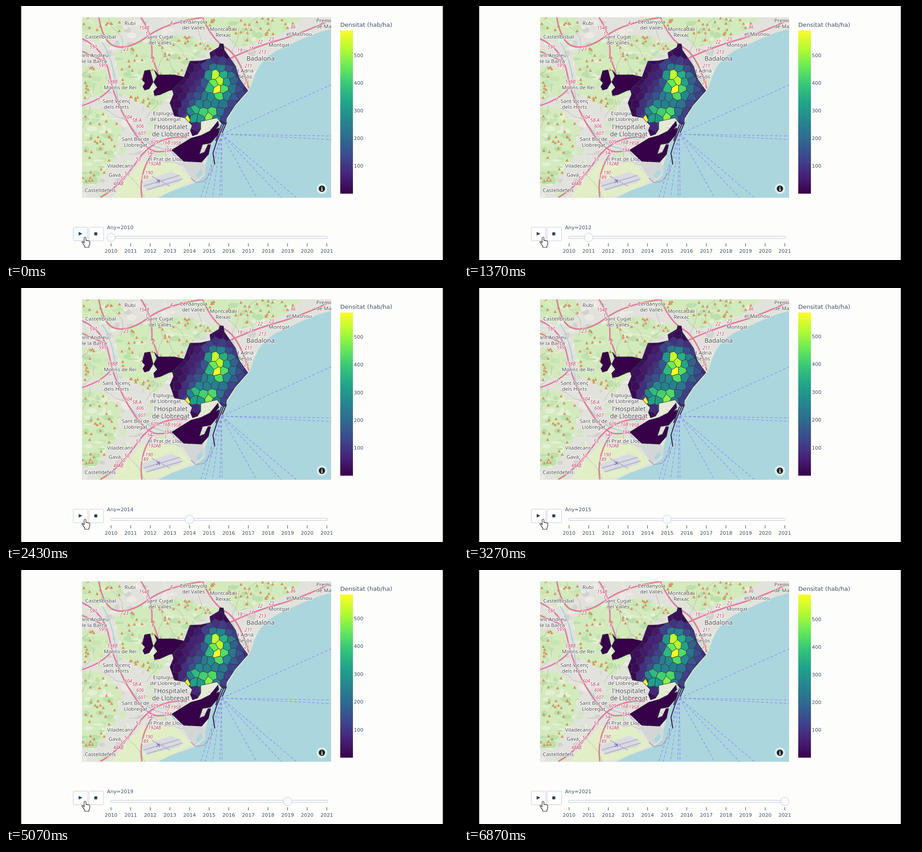
Write an HTML page that moves like this. It is 998 by 561 pixels and loops after 6910 ms.

```html
<!DOCTYPE html>
<html lang="ca">
<head>
<meta charset="utf-8">
<title>Densitat</title>
<style>
html, body { margin: 0; width: 100%; height: 100%; overflow: hidden; background: #fdfdfb; }
svg { display: block; width: 998px; height: 561px; }
.ui { font-family: "DejaVu Sans", sans-serif; font-size: 11px; fill: #3f4f69; }
.place, .ref { font-family: "Noto Sans", "Open Sans", sans-serif; text-anchor: middle;
  paint-order: stroke; stroke: #fffb; stroke-width: 2.5px; stroke-linejoin: round; }
.place { fill: #4b4a50; font-size: 11.5px; }
.big { font-size: 14px; }
.ref { fill: #b83a5c; font-size: 10px; font-style: italic; font-weight: 500; }
</style>
</head>
<body>
<svg viewBox="0 0 998 561">
  <defs>
    <clipPath id="frame"><path d="M168 25H718V423.500H168z"/></clipPath>
    <clipPath id="cityClip"><path id="cityShape"/></clipPath>
    <clipPath id="hillClip"><path id="hillShape"/></clipPath>
    <linearGradient id="scale" x1="0" y1="1" x2="0" y2="0"></linearGradient>
  </defs>
  <path d="M0 0H33.500V561H0zM964.500 0H998V561H964.500z"/>
  <g clip-path="url(#frame)">
    <path fill="#e2e2dc" d="M168 25H718V424H168z"/>
    <g id="land"></g>
    <g id="roads" fill="none" stroke-linejoin="round"></g>
    <g id="sea"></g>
    <g id="labels"></g>
    <g id="city" stroke="#333b40" stroke-linejoin="round"></g>
    <circle cx="697.5" cy="403.5" r="11.5" fill="#fff" opacity=".6"/>
    <circle cx="697.5" cy="403.5" r="7" fill="#222"/>
    <path d="M697.5 399v1.9M696 402.8h1.7v4M695.7 407h4" stroke="#fff" stroke-width="1.6" fill="none"/>
  </g>
  <g class="ui">
    <text x="738" y="46" font-size="13.1">Densitat (hab/ha)</text>
    <path fill="url(#scale)" d="M738 54H766V414.500H738z"/>
    <g id="ticks"></g>
    <g stroke="#c3cad6">
      <rect id="play" x="148.5" y="488.5" width="32" height="30" rx="2"/>
      <rect x="183.5" y="488.5" width="32" height="30" rx="2" fill="#fff"/>
      <rect x="230.5" y="508.5" width="480" height="5" rx="2.5" fill="#f8fafc"/>
      <circle id="handle" cy="511" r="9.5" fill="#f8fafc"/>
    </g>
    <path fill="#2a3f5f" d="M160.500 499L168.500 503L160.500 507zM195 500h6.500v6.500h-6.500z"/>
    <text id="year" x="223" y="493"></text>
    <g id="years" text-anchor="middle"></g>
  </g>
  <path fill="#fff" stroke="#222" stroke-width="1.2" stroke-linejoin="round"
    d="M172.500 521v-9q2-3 4 0v6q2-1 3 .5q2-1 3 .5q2.500-.5 2.500 2v4q0 3-2 5v3h-9v-2q-1-3-4-6l-2.500-4q1-2 3 0l2 2z"/>
</svg>
<script>
const $ = id => document.getElementById(id);
const add = (id, markup) => $(id).insertAdjacentHTML('beforeend', markup);
const path = (d, attrs = '') => `<path d="${d}" ${attrs}/>`;

let seed = 11;
const random = () => (seed = seed * 16807 % 2147483647) / 2147483647;
const between = (a, b) => a + random() * (b - a);
const repeat = (n, make) => Array.from({ length: n }, (_, i) => make(i)).join('');

const palette = ['#37014a', '#472279', '#3d478d', '#2f6990', '#25868f',
  '#20a48a', '#35c67a', '#68ea58', '#b5fb31', '#fdfb2b'];
const rgb = hex => [1, 3, 5].map(i => parseInt(hex.slice(i, i + 2), 16));
function colour(share) {
  const x = Math.max(0, Math.min(0.9999, share)) * 9, i = Math.floor(x);
  const a = rgb(palette[i]), b = rgb(palette[i + 1]);
  return `rgb(${a.map((v, k) => Math.round(v + (b[k] - v) * (x - i)))})`;
}
palette.forEach((c, i) => add('scale', `<stop offset="${i / 9}" stop-color="${c}"/>`));

// Land: hills with woods and peaks, built-up blocks elsewhere
const hills = 'M240 105L290 78L382 62L474 86L404 124L366 190L330 236L254 190Z' +
  'M384 25H655L616 58L545 84L505 92L480 48L440 50Z' +
  'M168 130L222 140L228 175L212 198L168 205ZM168 222L214 228L256 270L240 340L196 398L168 394Z' +
  'M168 25H245L262 52L214 82L168 66Z';
const hillArea = new Path2D(hills), tester = document.createElement('canvas').getContext('2d');
const inHills = (x, y) => tester.isPointInPath(hillArea, x, y);
$('hillShape').setAttribute('d', hills);

const blob = (fills, size) => {
  const fill = fills[Math.floor(random() * fills.length)];
  return `<ellipse cx="${between(168, 640)}" cy="${between(25, 423)}" rx="${between(2, size)}" ry="${between(2, size * .6)}" fill="${fill}"/>`;
};
const peak = () => {
  const x = between(168, 640), y = between(25, 400);
  return inHills(x, y) ? path(`M${x} ${y - 4}l3.500 6.500h-7z`) : '';
};
add('land', repeat(260, () => blob(['#d3d2d1', '#d8d8d6', '#eceae3', '#d3e8bf'], 13)) +
  `<g clip-path="url(#hillClip)">${path(hills, 'fill="#d3eabd"')}${repeat(330, () => blob(['#bcdfab', '#c7e5b4', '#e3f0d5'], 14))}</g>` +
  path('M250 400L300 345L372 344L412 386L350 416L300 424H236Z', 'fill="#e1eec6"') +
  path('M300 388L365 366L388 376L384 390L310 408Z', 'fill="#dadae2"') +
  path('M303 398L383 374M311 406L390 382M322 376L362 398', 'stroke="#b9b8cc" stroke-width="2.500"') +
  path('M428 248L466 247L460 270L430 286Z', 'fill="#e4ead4"') +
  `<g fill="#d09960">${repeat(520, peak)}</g>`);

// Sea, harbour and ferry lines fanning out from the port
add('sea', path('M718 50L690 58L655 72L622 87L596 99L574 114L558 134L548 154L541 176L534 190L506 222L482 262L468 258L446 330L440 350L438 374L420 389L366 408L334 424H718Z', 'fill="#abd6de" stroke="#e5e3cd"') +
  path('M386 344L432 347L440 352L437 372L418 388L405 374Z', 'fill="#d4d5d6"') +
  path('M453 350L455 364L437 387L419 390L408 380', 'fill="none" stroke="#aaa5bd" stroke-width="2"') +
  path('M430 360L435 369L424 381L419 374Z', 'fill="#abd6de"') +
  path(['718 174', '718 287', '718 295', '641 423', '608 423', '553 423', '477 423', '472 423', '456 423', '440 423', '430 423']
    .map(end => `M476 283L${end}`).join(''), 'stroke="#8a8aef" stroke-width="1.2" stroke-dasharray="6 4"'));

// Roads: a few motorways over a seeded web of streets
const street = () => {
  let d = `M${between(168, 560)} ${between(25, 400)}`, angle = between(0, 6.3);
  for (let i = 0; i < 5; i++, angle += between(-.7, .7)) d += `l${18 * Math.cos(angle)} ${18 * Math.sin(angle)}`;
  return d;
};
const motorways = 'M168 72Q218 95 228 150T272 262T334 322L372 320M168 220Q215 205 234 178M208 423Q250 400 290 342T400 290' +
  'M300 423Q292 370 324 324M205 25Q215 85 245 90T314 66T436 25M298 25Q325 65 322 110L336 150' +
  'M434 25Q455 75 485 92T536 182M718 30Q650 62 600 76T494 116M168 100L222 124';
add('roads', path(repeat(26, street), 'stroke="#b9b6b4" stroke-width="1"') + path(repeat(16, street), 'stroke="#f7efd2" stroke-width="1.3"') +
  path('M212 80Q235 110 244 186T322 308L366 322L386 345', 'stroke="#a6cbd8" stroke-width="2"') +
  path(motorways, 'stroke="#d8688c" stroke-width="3"') + path(motorways, 'stroke="#ec94ab" stroke-width="1"'));

// Labels: one or two lines, centre x and first baseline
['Rubí@274 42', 'Castellbisbal@209 72', 'Sant Cugat/del Vallès@340 72', 'Cerdanyola/del Vallès@414 39',
  'Montcada i/Reixac@480 55', 'Premià/de Mar@704 36', 'el Masnou@647 66', 'Montgat@603 90', 'Badalona@562 121 big',
  'Sant Adrià/de Besòs@519 147', 'Sant Andreu/de la Barca@193 113', 'Molins de Rei@252 184', 'Sant Vicenç/dels Horts@244 214',
  'Esplugues/de Llobregat@352 241', "l'Hospitalet/de Llobregat@364 272 big", 'Sant Boi de/Llobregat@286 298',
  'el Prat de Llobregat@366 342', 'Viladecans@252 357', 'Gavà@240 377', 'Castelldefels@208 411', 'Barcelona@463 239 big'
].forEach(item => {
  const [text, place] = item.split('@'), [x, y, size = ''] = place.split(' ');
  text.split('/').forEach((line, i) =>
    add('labels', `<text class="place ${size}" x="${x}" y="${+y + i * (size ? 16 : 13)}">${line}</text>`));
});
('591@193 94,595@213 135,154B@305 52,11@313 65,23@265 99,8@324 125,4@365 41,598B@235 171,7@205 211,604@270 249,5B-A@289 256,' +
  '606@296 269,607@300 285,609@328 304,16B@354 305,195B@375 307,194@357 322,54@317 328,53@292 342,192AB@328 352,190@316 372,' +
  '189@306 382,50@267 374,50@258 384,48AB@248 396,86@634 50,22@561 83,23@586 77,19@516 102,21@541 98,213@566 105,211@535 136,26@531 173')
  .split(',').forEach(item => {
    const [text, x, y] = item.split(/[@ ]/);
    add('labels', `<text class="ref" x="${x}" y="${y}">${text}</text>`);
  });
add('labels', '<text x="337" y="392" font-size="15" fill="#7d69b5" text-anchor="middle" font-family="DejaVu Sans, sans-serif" transform="rotate(-45 337 387)">✈</text>');

// Density falls away from the centre; each peak adds x, y, radius, height
const densePeaks = [[423, 236, 24, 330], [452, 238, 17, 330], [462, 187, 19, 370], [463, 146, 20, 300], [483, 160, 28, 170]];
const bump = (x, y, cx, cy, r, height) => height * Math.exp(-((x - cx) ** 2 + (y - cy) ** 2) / r ** 2);
const density = (x, y) => densePeaks.reduce((sum, p) => sum + bump(x, y, ...p), bump(x, y, 470, 200, 62, 200));

const sites = [];
for (let row = 0; row < 13; row++)
  for (let col = 0; col < 11; col++) {
    const x = 362 + (col + row % 2 / 2) * 17 + between(-5, 5), y = 88 + row * 16 + between(-5, 5);
    sites.push({ at: [x, y], value: density(x, y) * between(.8, 1.15) });
  }

// Keeps the part of a polygon that is nearer to a than to b
function nearer(poly, a, b) {
  const side = p => (p[0] - (a[0] + b[0]) / 2) * (b[0] - a[0]) + (p[1] - (a[1] + b[1]) / 2) * (b[1] - a[1]);
  return poly.flatMap((p, i) => {
    const q = poly[(i + 1) % poly.length], s = side(p), t = side(q), kept = s <= 0 ? [p] : [];
    if (s * t < 0) kept.push(p.map((v, k) => v + (q[k] - v) * s / (s - t)));
    return kept;
  });
}
const box = [[350, 75], [545, 75], [545, 295], [350, 295]];
const cells = sites.map(site => {
  const poly = sites.reduce((shape, other) => other === site ? shape : nearer(shape, site.at, other.at), box);
  return `<polygon class="cell" points="${poly.map(p => p.map(v => v.toFixed(1))).join(' ')}"/>`;
});
const outline = 'M406 122L430 121L452 116L450 103L470 91L472 83L480 84L482 97L507 133L515 160L534 187L505 220L487 248L485 262L477 261L466 247L430 255L430 272L423 283L412 287L407 275L411 264L395 247L372 243L362 214L370 195L367 185L392 160Z';
$('cityShape').setAttribute('d', outline);
add('city', path('M327 141L337 152L372 152L394 157L401 168L398 180L373 184L360 187L340 196L328 198L326 188L334 180L326 168L333 155ZM306 143L318 141L325 168L316 183L306 186L302 178L307 170L301 164ZM366 318L408 292L430 286L450 276L468 254L470 264L463 272L471 269L468 284L452 303L434 306L427 327L438 323L446 306L452 306L447 328L432 345L392 343Z', `fill="${palette[0]}"`) +
  path('M482 258L465 300L457 325L461 350M476 262L463 298M487 257L477 280', 'fill="none" stroke="#39204f" stroke-width="2.200"') +
  `<g clip-path="url(#cityClip)">${cells.join('')}</g>` + path(outline, 'fill="none"') +
  path('M395 247L401 240L407 252L404 257Z', `fill="${palette[9]}"`));

// Controls
const yearX = i => 232 + i * 43.3;
for (let i = 0; i < 12; i++)
  add('years', path(`M${yearX(i)} 524v7`, 'stroke="#333"') + `<text x="${yearX(i)}" y="545">${2010 + i}</text>`);
for (let i = 1; i <= 6; i++) add('ticks', `<text x="768">${i * 100}</text>`);

const LOOP = 6910, FIRST = 847, STEP = 508, HANDLE_LAG = 40, PEAK_YEAR = 10;
const scaleMax = i => i === PEAK_YEAR ? 600 : 590 - 8 * Math.exp(-(((i - 7) / 2.8) ** 2));
const stepAt = t => Math.max(0, Math.min(11, Math.floor((t - FIRST) / STEP) + 1));
const cellNodes = [...document.querySelectorAll('.cell')];
let shown = -1;

function showYear(step) {
  const max = scaleMax(step);
  cellNodes.forEach((node, i) => node.setAttribute('fill', colour(sites[i].value / max)));
  [...$('ticks').children].forEach((node, i) => {
    const value = (i + 1) * 100;
    node.setAttribute('y', 418.5 - value / max * 360);
    node.setAttribute('visibility', value <= max ? 'visible' : 'hidden');
  });
  shown = step;
}

function render(now) {
  const t = now % LOOP, settled = stepAt(t - HANDLE_LAG);
  $('year').textContent = 'Any=' + (2010 + stepAt(t));
  $('handle').setAttribute('cx', yearX(settled));
  $('play').setAttribute('fill', t < 300 ? '#f4faff' : '#fff');
  if (settled !== shown) showYear(settled);
}
const start = performance.now();
function loop() {
  render(performance.now() - start);
  requestAnimationFrame(loop);
}
loop();
</script>
</body>
</html>
```
